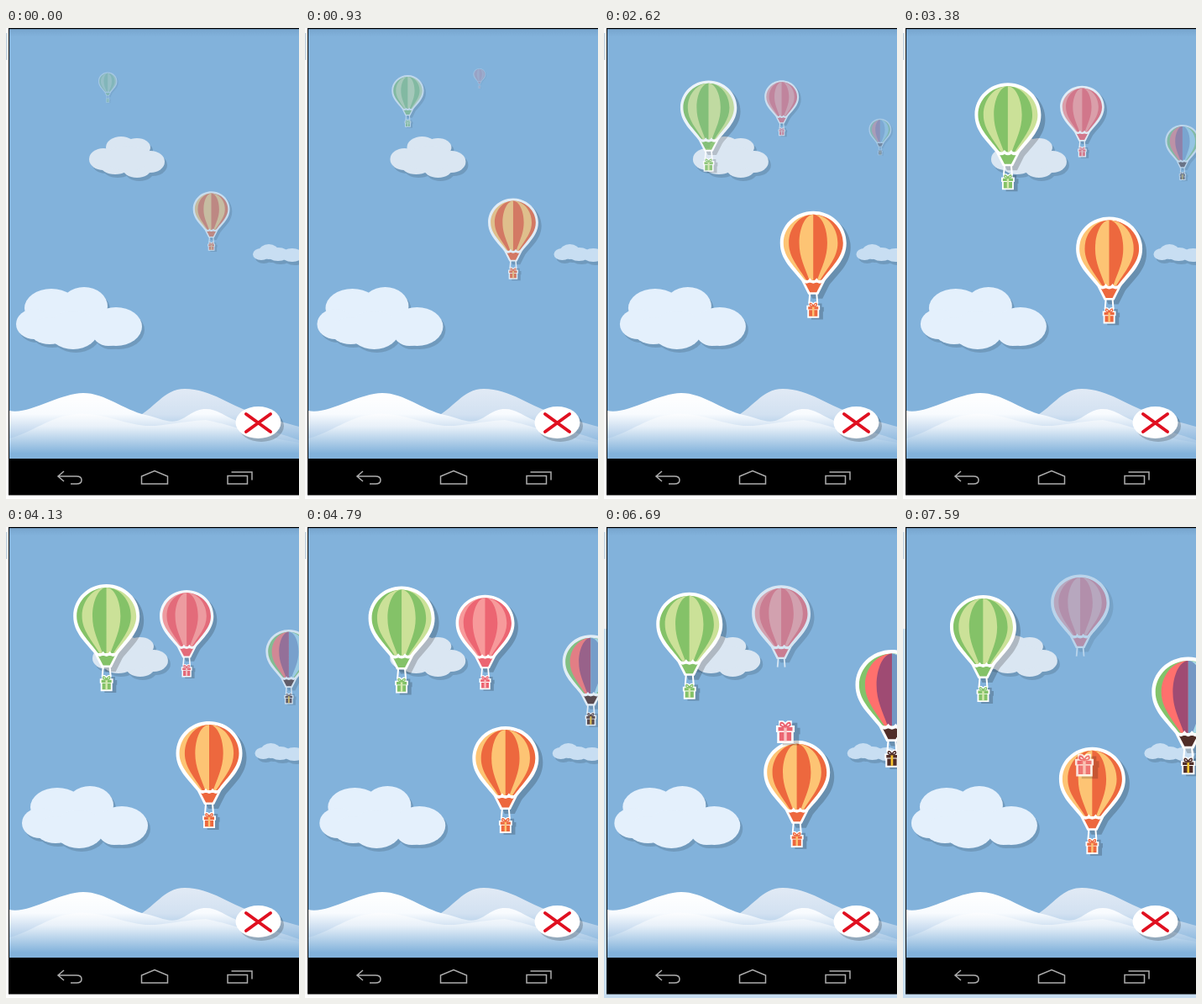
Animation, 349 px wide and 560 px high, one loop 8 s. Source, as an HTML page:

```html
<!DOCTYPE html>
<html lang="en">
<head>
<meta charset="utf-8">
<title>Balloons</title>
<style>
html, body { margin: 0; width: 100%; height: 100%; overflow: hidden; background: #fff; }
svg { display: block; width: 100%; height: 100%; }
</style>
</head>
<body>
<svg id="stage" viewBox="0 0 349 560" preserveAspectRatio="none">
  <defs>
    <linearGradient id="snow" gradientUnits="userSpaceOnUse" x1="0" y1="434" x2="0" y2="506">
      <stop offset="0" stop-color="#fff"/>
      <stop offset=".35" stop-color="#f8fbfe"/>
      <stop offset=".6" stop-color="#cbddf0"/>
      <stop offset="1" stop-color="#82b2db"/>
    </linearGradient>
    <linearGradient id="far" gradientUnits="userSpaceOnUse" x1="0" y1="429" x2="0" y2="490">
      <stop offset="0" stop-color="#e1eaf5"/>
      <stop offset=".5" stop-color="#d2e1f1"/>
      <stop offset="1" stop-color="#93bce0"/>
    </linearGradient>
    <linearGradient id="drift" gradientUnits="userSpaceOnUse" x1="0" y1="456" x2="0" y2="506">
      <stop offset="0" stop-color="#fff"/>
      <stop offset=".35" stop-color="#e9f1f9"/>
      <stop offset="1" stop-color="#82b2db"/>
    </linearGradient>
    <linearGradient id="shade" x2="0" y2="1">
      <stop offset="0" stop-color="#78a6cf"/>
      <stop offset="1" stop-color="#82b2db"/>
    </linearGradient>
    <path id="hull" d="M0 0C22 0 39.5 17 39.5 38C39.5 58 24 70 14 83L6 99H-6L-14 83C-24 70-39.5 58-39.5 38C-39.5 17-22 0 0 0Z"/>
    <path id="half" d="M0 4C19 4 35.5 19 35.5 38C35.5 55 21 67 10 82H0Z"/>
    <path id="box" d="M-8.5 112H-6L-6 107.5H-2L0 109L2 107.5H6L6 112H8.5V118H7.5V128H-7.5V118H-8.5Z"/>
    <path id="ropes" d="M-4 98L-5 110M4 98L5 110"/>
    <g id="big">
      <ellipse cx="54" cy="333" rx="32" ry="23"/><ellipse cx="93" cy="331" rx="28" ry="23"/>
      <ellipse cx="34" cy="352" rx="22" ry="18"/><ellipse cx="52" cy="360" rx="24" ry="16"/>
      <ellipse cx="80" cy="359" rx="30" ry="23"/><ellipse cx="122" cy="360" rx="20" ry="18"/>
      <ellipse cx="131" cy="355" rx="31" ry="23"/>
    </g>
    <g id="mid">
      <ellipse cx="137" cy="142" rx="18" ry="13"/><ellipse cx="156" cy="142" rx="16" ry="11"/>
      <ellipse cx="116" cy="156" rx="17" ry="13"/><ellipse cx="130" cy="163" rx="18" ry="11"/>
      <ellipse cx="156" cy="165" rx="18" ry="13"/><ellipse cx="172" cy="159" rx="17" ry="13"/>
      <ellipse cx="145" cy="155" rx="28" ry="15"/>
    </g>
    <g id="small">
      <ellipse cx="313" cy="266" rx="12" ry="9"/><ellipse cx="304" cy="269" rx="10" ry="7"/>
      <ellipse cx="324" cy="269" rx="13" ry="8"/><ellipse cx="341" cy="270" rx="13" ry="8"/>
    </g>
  </defs>
  <rect id="frame" width="349" height="560"/>
  <rect id="edge" width="3" height="121" fill="#f4f6f8"/>
  <rect y="6" width="2" height="32" fill="#cbd9e6"/>
  <rect x="3" width="346" height="555.5" fill="#000"/>
  <rect x="4" y="1.500" width="345" height="510.500" fill="#82b2db"/>
  <rect x="4" y="1.500" width="345" height="9" fill="url(#shade)"/>
  <g id="clouds"></g>
  <path fill="url(#far)" d="M150 466C178 453 187 429 213 429C242 429 264 447 292 457C315 465 335 470 349 474V510H150Z"/>
  <path fill="url(#snow)" d="M4 455C28 460 64 434 92 434C118 434 140 454 166 460C181 463 192 470 204 467C217 463 223 453 238 453C255 453 262 465 285 470C310 477 332 484 349 490V512H4Z"/>
  <path fill="url(#drift)" d="M4 488C35 480 50 462 84 459C116 457 136 470 166 473C186 474 206 468 238 466C270 472 300 486 349 493V512H4Z"/>
  <g id="balloons"></g>
  <ellipse cx="304" cy="473" rx="27" ry="19" fill="#000" opacity=".2"/>
  <ellipse cx="300.500" cy="469" rx="27" ry="19" fill="#fff"/>
  <path d="M286 459L315 480M315 459L286 480" fill="none" stroke="#e01020" stroke-width="4" stroke-linecap="round"/>
  <g fill="none" stroke="#adadad" stroke-width="1.500">
    <path d="M69 527L62 533L69 539M62 533H84Q90 533 90 537.500T84 542H77"/>
    <path d="M161.500 542V533L177 526.500L192.500 533V542Z"/>
    <path d="M264 532.500H287.500V542H264ZM268.500 528H293V537.500"/>
  </g>
  <path id="cursor" d="M0 0V13L3 10.300L5 15L7.300 14L5.300 9.500H9.500Z" fill="#000" stroke="#fff" stroke-width=".8"/>
</svg>
<script>
const LOOP = 8000, DROP = 5.48;
const $ = id => document.getElementById(id);

function add(parent, name, attrs) {
  const el = document.createElementNS('http://www.w3.org/2000/svg', name);
  for (const k in attrs) el.setAttribute(k, attrs[k]);
  return parent.appendChild(el);
}
const use = (parent, id, attrs) => add(parent, 'use', { href: '#' + id, ...attrs });
const put = (el, x, y, s = 1) => el.setAttribute('transform', `translate(${x} ${y}) scale(${s})`);
const shadow = (parent, id, x, y) => use(parent, id, { transform: `translate(${x} ${y})`, opacity: .2 });

function drawGift(parent, color, ribbon) {
  const gift = add(parent, 'g', {});
  const g = add(gift, 'g', { transform: 'translate(0 8) scale(.93)' });
  shadow(g, 'box', 5, 2);
  use(g, 'box', { fill: '#fff' });
  add(g, 'path', { d: 'M-6.5 113.5H6.5V117H-6.5ZM-5.5 118H5.5V126H-5.5Z', fill: color });
  add(g, 'path', { d: 'M-1.3 113.5H1.3V126H-1.3Z', fill: ribbon });
  add(g, 'path', { d: 'M0 113Q-6 113-4 109.5Q-2 109 0 113Q2 109 4 109.5Q6 113 0 113', fill: 'none', stroke: color, 'stroke-width': 1.5 });
  return gift;
}

function drawBalloon(b) {
  const g = b.el = add($('balloons'), 'g', {});
  shadow(g, 'hull', 5, 5);
  use(g, 'hull', { fill: '#fff' });
  use(g, 'ropes', { stroke: '#fff', 'stroke-width': 2 });
  const widths = [1, .82, .47];
  widths.forEach((w, i) => {
    use(g, 'half', { transform: `scale(${-w} 1)`, fill: b.panels[i] });
    use(g, 'half', { transform: `scale(${w} 1)`, fill: b.panels[5 - i] });
  });
  add(g, 'path', { d: 'M-10 85H10L4 96.5H-4Z', fill: b.skirt });
  add(g, 'path', { d: 'M-12 82q4 5 8 0q4 5 8 0q4 5 8 0', fill: 'none', stroke: '#fff', 'stroke-width': 3 });
  b.gift = drawGift(g, b.skirt, b.ribbon);
}

const stripes = (a, b) => [a, b, a, b, a, b];

// Each balloon grows until `peak` (s), then keeps its size and drifts back.
const balloons = [
  { panels: ['#83c36a', '#ff706d', '#9f4b73', '#7397c4', '#a9d9ea', '#83c36a'], skirt: '#4f2d28', ribbon: '#f9c630',
    peak: 5.85, max: 1.1, grow: .235, x: 346, vIn: 5.3, vOut: -3.6, y: 83.2, vy: 9.4 },
  { panels: stripes('#f79a9b', '#ec6572'), skirt: '#ec6572', ribbon: '#fbc3c3',
    peak: 4.5, max: .885, grow: .195, x: 216, vIn: 2.3, vOut: -5, y: 40, vy: 8.5, drops: true },
  { panels: stripes('#84c268', '#cbe198'), skirt: '#84c268', ribbon: '#d6e9ae',
    peak: 3.3, max: 1, grow: .217, x: 125.5, vIn: 1.3, vOut: -7, y: 52.6, vy: 3.75 },
  { panels: stripes('#fdc474', '#ed683e'), skirt: '#ed683e', ribbon: '#fdc474',
    peak: 2.05, max: 1, grow: .217, x: 252, vIn: 3.6, vOut: -4.8, y: 194.3, vy: 8.9 }
];
balloons.forEach(drawBalloon);
const falling = drawGift($('balloons'), '#ec6572', '#fbc3c3');

const clouds = [
  { id: 'big', fill: '#e4f0fc', peak: 3.4 },
  { id: 'mid', fill: '#dae6f2', peak: 2.82 },
  { id: 'small', fill: '#c8def2', peak: 2.53 }
];
for (const c of clouds) {
  c.el = add($('clouds'), 'g', {});
  use(c.el, c.id, { transform: 'translate(3 4)', opacity: .13 });
  use(c.el, c.id, { fill: c.fill });
}

const clamp = (v, lo = 0, hi = 1) => Math.min(hi, Math.max(lo, v));
const mix = (a, b, k) => a + (b - a) * k;

function moveBalloon(b, t) {
  const after = b.drops ? Math.max(0, t - DROP) : 0;
  const now = t - after, d = now - b.peak;
  const s = clamp(b.max + b.grow * d, 0, b.max);
  put(b.el, b.x + d * (d < 0 ? b.vIn : b.vOut), b.y + b.vy * now - 14.3 * after, s);
  b.el.setAttribute('opacity', clamp(s / b.max - .26 * after));
  b.gift.setAttribute('visibility', after ? 'hidden' : 'inherit');
}

function moveGift(t) {
  const d = t - DROP, s = clamp(.885 + .5 * d, .885, 1.4);
  falling.setAttribute('visibility', d > 0 ? 'visible' : 'hidden');
  put(falling, 211 + clamp(6 * d, 0, 5), 191 + 44 * d - 118 * s, s);
  falling.setAttribute('opacity', clamp(1 - .2 * (d - 1.2)));
}

function moveCursor(t) {
  const a = clamp((t - 5.5) / .38), b = clamp((t - 5.96) / .17);
  put($('cursor'), mix(212, 198, a) + 2 * b, mix(190, 436.5, a) + 14 * b);
  $('cursor').setAttribute('visibility', t > 5.3 && t < 6.2 ? 'visible' : 'hidden');
}

function render(t) {
  const focused = t > 5.3;
  $('frame').setAttribute('fill', focused ? '#c6dcf0' : '#fff');
  $('edge').setAttribute('visibility', focused ? 'visible' : 'hidden');
  for (const c of clouds) put(c.el, 2.63 * (c.peak - Math.abs(t - c.peak)), 0);
  for (const b of balloons) moveBalloon(b, t);
  moveGift(t);
  moveCursor(t);
}

const start = performance.now();
function tick() {
  render((performance.now() - start) % LOOP / 1000);
  requestAnimationFrame(tick);
}
tick();
</script>
</body>
</html>
```
